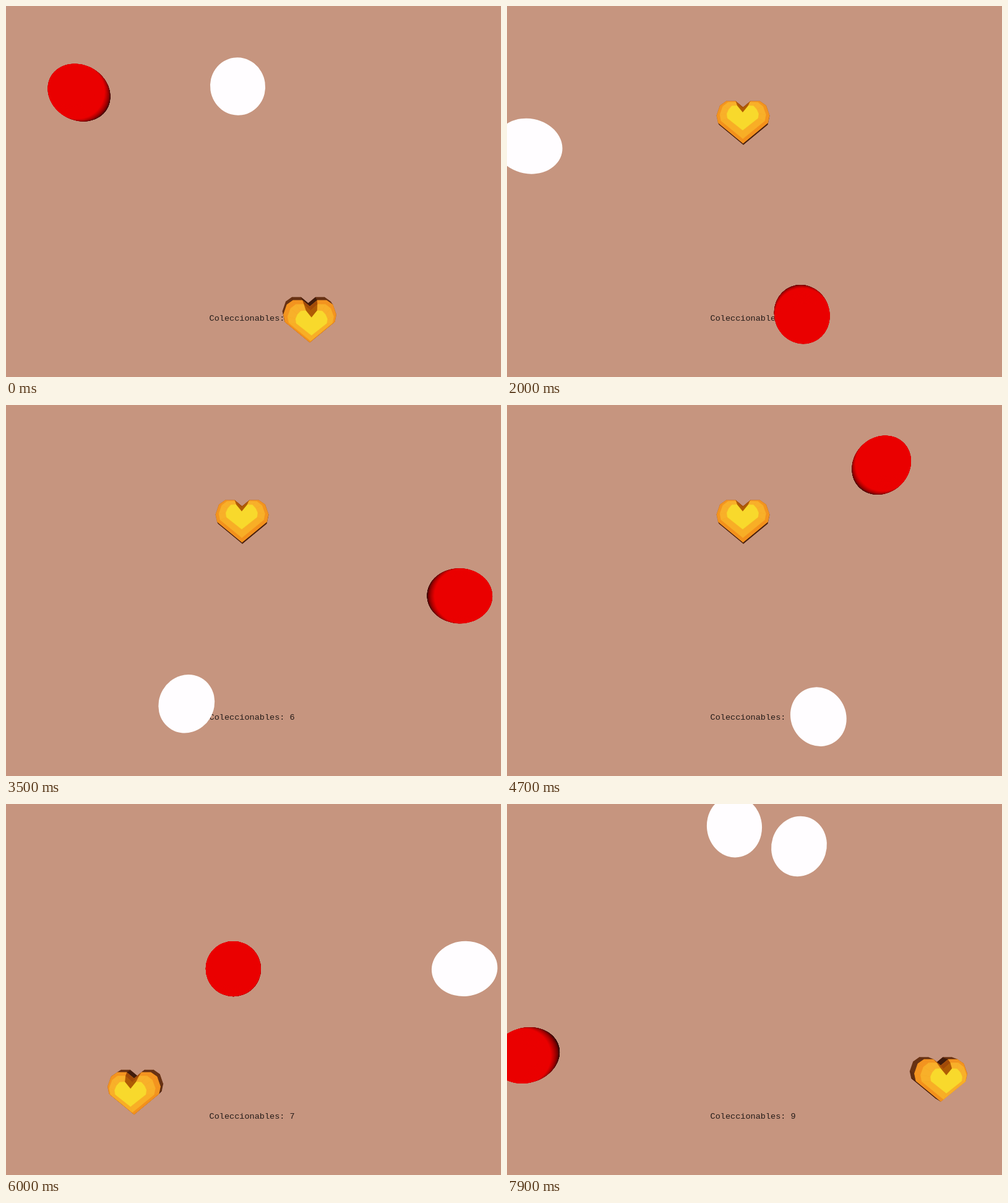
Recreate the animation shown at these times as an HTML page with a canvas. Size 800x600 px, loop 8000 ms.

```html
<!DOCTYPE html>
<html lang="es">
<head>
<meta charset="utf-8">
<title>Coleccionables</title>
<style>
  html, body { margin: 0; width: 100%; height: 100%; overflow: hidden; background: #c6957f; }
  canvas { display: block; }
</style>
</head>
<body>
<canvas id="stage" width="800" height="600"></canvas>
<script>
const ctx = document.getElementById('stage').getContext('2d');
const LOOP = 8000, STEP = 100;
const CX = 400, CY = 300, FOCAL = 520, RADIUS = 44.5;
const SPAWN = 6700;

// Collectible: start time, x, y, score shown
const stops = [
  [0, 491, 508, 5], [1700, 381.5, 186, 6], [5600, 207, 466, 7], [SPAWN, 701, 445, 9]
];

// Right half of the heart, from notch to tip
const rim = [[0, -22], [12, -32], [27, -32], [37, -25], [42.5, -9], [40, 3], [0, 36]];
const crown = [[0, -10], [9, -21], [17, -20.5], [22, -15], [25, -8], [24, -1], [0, 18]];
const mix = (a, b, k) => a + (b - a) * k;
const bevel = rim.map((p, i) => p.map((v, j) => mix(v, crown[i][j], 0.33)));

// All balls share one diagonal speed, with a slight drift
const travel = t => 0.177 * t + 6 * Math.sin(t * 2 * Math.PI / 5600);

// Bounce a coordinate between two walls
function fold(v, lo, hi) {
  const span = hi - lo, m = (((v - lo) % (2 * span)) + 2 * span) % (2 * span);
  return lo + (m < span ? m : 2 * span - m);
}
const bounce = (x, y) => [fold(x, 25.5, 775), fold(y, -1, 599.5)];

// The red ball turns upright at its own points
function redPos(s) {
  let y = 140 + s, sign = 1;
  for (const turn of [392, 861, 1303]) {
    if (s > turn) y -= 2 * sign * (s - turn);
    sign = -sign;
  }
  return [fold(118 + s, 25.5, 775), y];
}

// Scale a point about the vanishing point
const project = (x, y, k) => [CX + (x - CX) * k, CY + (y - CY) * k];

// A sphere seen off axis is an ellipse stretched away from the centre
function silhouette([x, y], color) {
  const dx = x - CX, dy = y - CY;
  const long = RADIUS * Math.hypot(1, Math.hypot(dx, dy) / FOCAL);
  ctx.fillStyle = color;
  ctx.beginPath();
  ctx.ellipse(x, y, long, RADIUS, Math.atan2(dy, dx), 0, 7);
  ctx.fill();
}

// Frontal light: each level of brightness is a circle parallel to the screen
function litBall(pos) {
  const ratio = 0.085, dark = -0.45, full = 0.2;
  const shade = c => {
    const k = Math.min(1, Math.max(0, (c - dark) / (full - dark)));
    return `rgb(${Math.round(mix(40, 234, k))},0,0)`;
  };
  const [x, y] = project(pos[0], pos[1], 1 / 1.0073);
  silhouette(pos, shade(dark));
  for (let c = -0.6; c < 0.8; c += 0.025) {
    const k = 1 / (1 - ratio * c);
    const [px, py] = project(x, y, k);
    ctx.fillStyle = shade(c);
    ctx.beginPath();
    ctx.arc(px, py, 44.4 * Math.sqrt(1 - c * c) * k, 0, 7);
    ctx.fill();
  }
}

function polygon(points, color) {
  ctx.fillStyle = ctx.strokeStyle = color;
  ctx.lineWidth = 0.4;
  ctx.beginPath();
  points.forEach(p => ctx.lineTo(p[0], p[1]));
  ctx.closePath();
  ctx.fill();
  ctx.stroke();
}

// Facets turned to the notch or downwards get less light
function facetColor(i, [hue, sat, light], drop) {
  const dx = rim[i + 1][0] - rim[i][0], dy = rim[i + 1][1] - rim[i][1];
  const len = Math.hypot(dx, dy);
  const k = 1 - 0.6 * Math.max(0, -dy / len) - drop * Math.max(0, -dx / len);
  return `hsl(${hue * Math.sqrt(k)},${sat}%,${light * k}%)`;
}

function heart(x, y) {
  const layer = (half, k) => [1, -1].map(s =>
    half.map(([dx, dy]) => project(x + s * dx, y + dy, k)));
  const solid = ([a, b], color) => polygon([...a, ...b.slice().reverse()], color);
  const band = (outer, inner, base, drop) => outer.forEach((side, s) => {
    for (let i = 0; i < side.length - 1; i++) {
      polygon([side[i], side[i + 1], inner[s][i + 1], inner[s][i]], facetColor(i, base, drop));
    }
  });
  const back = layer(rim, 0.972), edge = layer(rim, 1);
  const mid = layer(bevel, 1.015), top = layer(crown, 1.03);
  solid(back, '#632d11');
  band(back, edge, [22, 68, 24], 0.4);
  solid(edge, '#f08f1f');
  band(edge, mid, [33, 90, 54], 0.02);
  band(mid, top, [39, 94, 57], 0.02);
  solid(top, '#f8d92c');
}

function draw(t) {
  const [, hx, hy, score] = stops.filter(s => s[0] <= t).pop();
  const s = travel(t);
  ctx.fillStyle = '#c6957f';
  ctx.fillRect(0, 0, 800, 600);
  ctx.fillStyle = '#241b18';
  ctx.font = '13.55px "Liberation Mono", monospace';
  ctx.fillText('Coleccionables: ' + score, 328.5, 509);
  heart(hx, hy);
  silhouette(bounce(374.5 - s, 130 - s), '#fffdff');
  if (t >= SPAWN) silhouette(bounce(s - 1034, 1438 - s), '#fffdff');
  litBall(redPos(s));
}

function tick() {
  const t = performance.now() % LOOP;
  draw(Math.floor(t / STEP) * STEP);
  requestAnimationFrame(tick);
}
tick();
</script>
</body>
</html>
```
